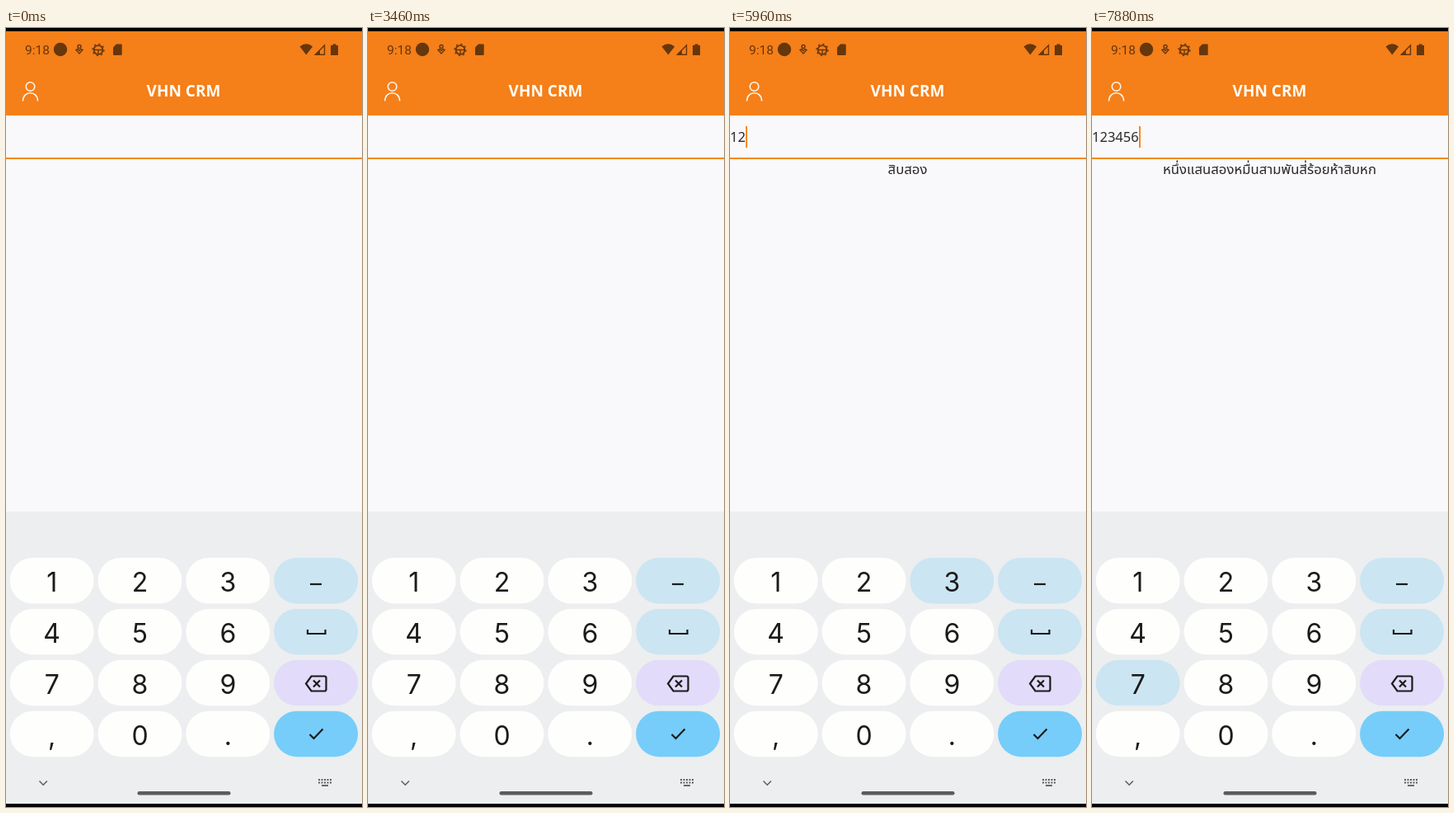
These frames come from a looping animation (432x944 px, 8000 ms). An HTML page:

```html
<!DOCTYPE html>
<html lang="th">
<head>
<meta charset="utf-8">
<title>Number reader</title>
<style>
  html, body { margin: 0; width: 432px; height: 944px; overflow: hidden; background: #000; }
  svg { display: block; }
  .key { font: 32px Inter, Roboto, sans-serif; fill: #1b1b1b; text-anchor: middle; }
  .line { fill: none; stroke: #1b1b1b; stroke-width: 2.2; }
  .body { font: 16.5px "Noto Sans", "Noto Sans Thai", sans-serif; fill: #2c2a28; }
  .words { font: 16.75px "Noto Sans Thai", "Noto Sans", sans-serif; text-anchor: middle; }
  .title { font: 600 19px "Noto Sans", sans-serif; fill: #fffdf6; text-anchor: middle; }
  .status { fill: #66360c; }
  .status text { font: 15.5px Roboto, sans-serif; }
  .thin { fill: none; stroke: #66360c; stroke-width: 1.4; }
</style>
</head>
<body>
<svg width="432" height="944" viewBox="0 0 432 944">
  <rect y="4" width="432" height="936" fill="#f9f8fa"/>
  <rect y="4" width="432" height="102" fill="#f57f19"/>
  <rect y="157" width="432" height="2" fill="#f08a1c"/>
  <rect y="586" width="432" height="354" fill="#eceeef"/>

  <g class="status">
    <text x="23" y="32">9:18</text>
    <circle cx="66" cy="26" r="8.2"/>
    <g class="thin">
      <circle cx="89" cy="22.5" r="2"/>
      <path d="M85 26.5l4 4.5 4-4.5-2-1-2 2-2-2z"/>
      <circle cx="112" cy="26.5" r="5.4" stroke-width="1.8"/>
      <circle cx="112" cy="26.5" r="7" stroke-dasharray="2.2 3.3"/>
      <path d="M107 26.5h10M112 27v4"/>
    </g>
    <path d="M134 19.5h5.5q1.2 0 1.2 1.2v11q0 1.2-1.2 1.2h-8.3q-1.2 0-1.2-1.2v-8.2z"/>
    <path d="M356.5 22.5q7.8-6.5 15.6 0l-7.8 10z"/>
    <path d="M375.500 32.200L386.500 21v11.200z" class="thin"/>
    <path d="M381 26.500v6h-6.500z"/>
    <path d="M396.500 19.500h4v1.500h2.500v12h-9V21h2.500z"/>
  </g>

  <g fill="none" stroke="#fff6ea" stroke-width="1.6">
    <circle cx="29.5" cy="71" r="5.3"/>
    <path d="M20.5 88.500c0-13 18-13 18 0"/>
  </g>
  <text class="title" x="215.5" y="83">VHN CRM</text>

  <text class="body" id="entry" x="0" y="138"></text>
  <rect id="caret" y="119" width="2" height="26" fill="#f58a1c"/>
  <text class="body words" id="words" x="215.5" y="177"></text>

  <g id="pad"></g>
  <g class="line">
    <path d="M369 674h14"/>
    <path d="M366 729v5h21.5v-5"/>
    <path d="M370.5 785.500h16q2 0 2 2v14q0 2-2 2h-16l-6.500-9zM373 790.500l8 8m0-8l-8 8"/>
    <path d="M368.5 856l5 5 11-11.500"/>
  </g>

  <g fill="none" stroke="#5c5c5c">
    <path d="M40.500 912.500l4.700 4.700 4.700-4.700" stroke-width="1.5"/>
    <path d="M379 911h16M379 914.500h16" stroke-width="1.8" stroke-dasharray="2 1.500"/>
    <path d="M383 918h8" stroke-width="1.8"/>
  </g>
  <rect x="159.500" y="925" width="113" height="4.400" rx="2.200" fill="#5c5c5c"/>
</svg>
<script>
const LOOP = 8000, CARET_STEP = 9.44;
const KEY = '#fefefc', GREY = '#cbe5f2';
const $ = id => document.getElementById(id);

// digit, time pressed, time released (and typed)
const presses = [
  [1, 4810, 5190], [2, 5380, 5770], [3, 5960, 6340], [4, 6920, 7120],
  [5, 7310, 7500], [6, 7690, 7880], [7, 7880, 8070]
];
// the caret toggles at each of these times, starting hidden
const blinks = [190, 580, 960, 1540, 1920, 2500, 3080, 3460, 3850, 4420, 4810, 6920, 7120];
const digitWords = ['', 'หนึ่ง', 'สอง', 'สาม', 'สี่', 'ห้า', 'หก', 'เจ็ด', 'แปด', 'เก้า'];
const placeWords = ['', 'สิบ', 'ร้อย', 'พัน', 'หมื่น', 'แสน', 'ล้าน'];

function spell(number) {
  return [...number].map((d, i) => {
    const place = number.length - 1 - i;
    const word = place === 1 && d === '1' ? '' : place === 1 && d === '2' ? 'ยี่' : digitWords[d];
    return word + placeWords[place];
  }).join('');
}

const labels = ['1', '2', '3', '', '4', '5', '6', '', '7', '8', '9', '', ',', '0', '.', ''];
const sideFills = [GREY, GREY, '#e2dbfa', '#76cdfa'];
$('pad').innerHTML = labels.map((label, i) => {
  const col = i % 4, row = i >> 2;
  const x = 4.7 + 106.8 * col, y = 642 + 61.9 * row;
  const fill = col === 3 ? sideFills[row] : KEY;
  return `<rect id="k${label || 'side' + row}" x="${x}" y="${y}" width="102" height="55.5" rx="27.7" fill="${fill}"/>
    <text class="key" x="${x + 51}" y="${y + 41}">${label}</text>`;
}).join('');

function draw(t) {
  const typed = presses.filter(p => t >= p[2]).map(p => p[0]).join('');
  $('entry').textContent = typed;
  $('words').textContent = spell(typed);
  for (const [digit, down, up] of presses)
    $('k' + digit).setAttribute('fill', t >= down && t < up ? GREY : KEY);
  const lit = blinks.filter(b => t >= b).length % 2;
  $('caret').setAttribute('x', typed ? Math.round(typed.length * CARET_STEP + 0.4) : 0);
  $('caret').setAttribute('visibility', lit ? 'visible' : 'hidden');
}

const start = performance.now();
function tick() {
  draw((performance.now() - start) % LOOP);
  requestAnimationFrame(tick);
}
tick();
</script>
</body>
</html>
```
